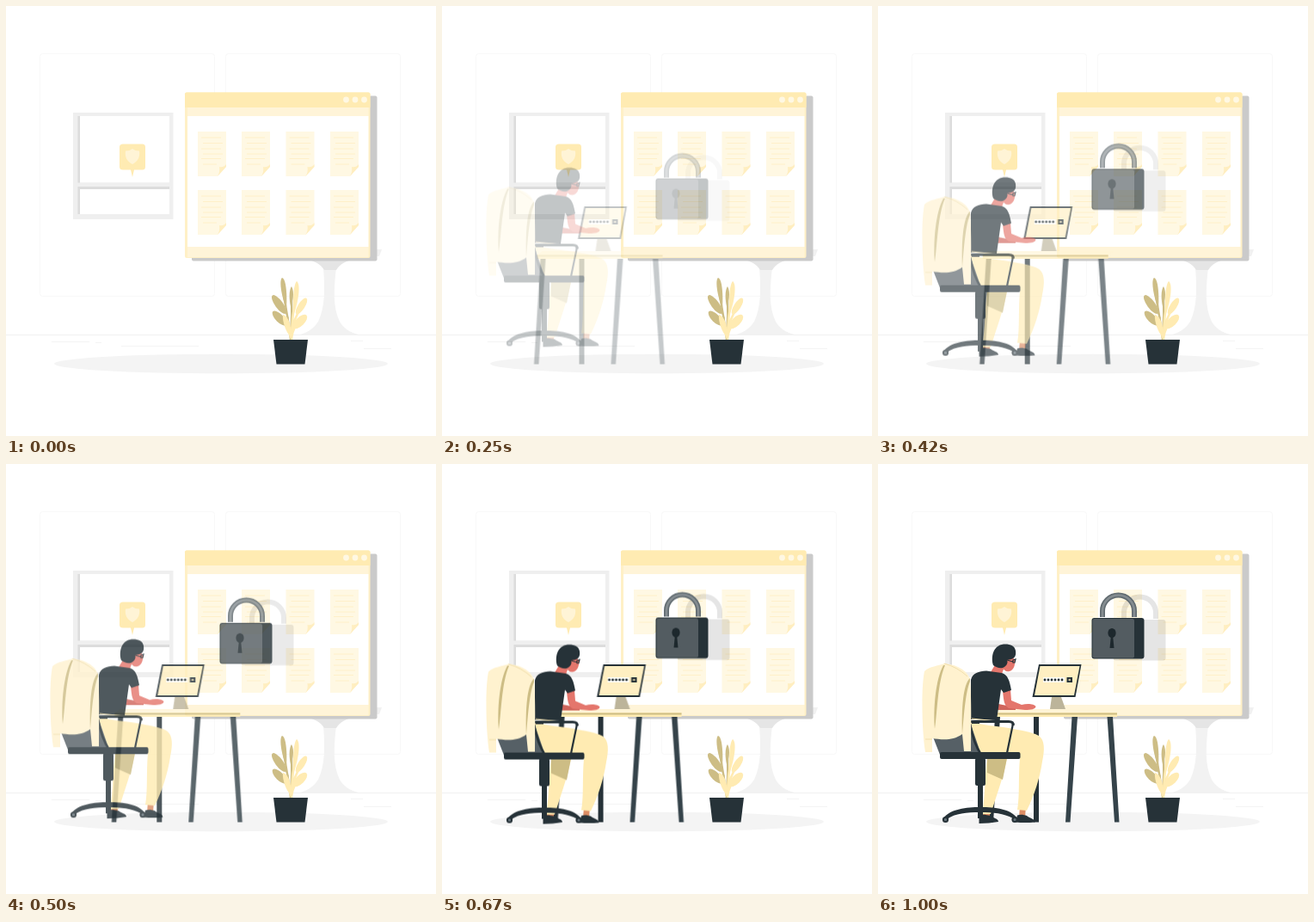
An HTML page that plays this animation: 500 px wide and 500 px high, repeating every 1040 ms.

```html
<!DOCTYPE html>
<html lang="en">
<head>
<meta charset="utf-8">
<title>Secure desk</title>
<style>
html, body { margin: 0; width: 100%; height: 100%; overflow: hidden; background: #fff; }
svg { display: block; width: 100vw; height: 100vh; }
.dark { fill: #263238; }
.cream { fill: #ffebb2; }
.pale { fill: #fff4d6; }
.olive { fill: #cdbd85; }
.skin { fill: #e4766c; }
.steel { fill: #566066; }
.line { fill: none; stroke: #263238; }

/* Each group slides 30px into place and overshoots a little. */
.enter { animation: enter 1040ms infinite; }
.down { --from: translateY(-30px); }
.right { --from: translateX(-30px); }
.up { --from: translateY(30px); }
@keyframes enter {
  0% {
    opacity: 0;
    transform: var(--from);
    animation-timing-function: cubic-bezier(.32, -.01, .483, 1.38);
  }
  93.3%, 100% { opacity: 1; transform: none; }
}
</style>
</head>
<body>
<svg viewBox="0 0 500 500">
  <defs>
    <g id="doc">
      <path fill="#fff8e3" d="M0 0H33V41L23 52H0z"/>
      <path fill="#ffeec0" d="M23 52Q26 47 25 41Q30 42 33 38V41z"/>
      <path fill="none" stroke="#fff0c9" d="M4 7H27M6 13.500H29M4 20H27M6 26H29M4 31.500H27M6 38H22"/>
    </g>
    <g id="row">
      <use href="#doc" x="223"/>
      <use href="#doc" x="274"/>
      <use href="#doc" x="325.500"/>
      <use href="#doc" x="377"/>
    </g>
    <path id="shackle" d="M261 178V171A18.500 18.500 0 0 1 298 171V178"/>
  </defs>

  <!-- room -->
  <g fill="none" stroke="#f8f8f8">
    <rect x="39.500" y="55.500" width="203" height="282" rx="3"/>
    <rect x="255.500" y="55.500" width="203" height="282" rx="3"/>
    <path stroke="#f1f1f1" d="M0 382.500H500"/>
    <path stroke="#f4f4f4" d="M53 390.500H97M104 391.500H111M134 395.500H224M401 389.500H415M416 398.500H448"/>
  </g>
  <ellipse cx="250" cy="416" rx="194" ry="11.300" fill="#f4f4f4"/>

  <!-- window -->
  <path fill="#efefef" d="M78 124H194.500V248H78z"/>
  <path fill="#dcdcdc" d="M83.500 128H190V205.500H83.500zM83.500 210H190V242H83.500z"/>
  <path fill="#fff" d="M86 128H190V205.500H86zM86 213H190V242H86z"/>

  <!-- round table -->
  <path fill="#f1f1f1" d="M337 283H437L434 291H345z"/>
  <path fill="#f2f2f2" d="M369 304C371 330 371 350 363 367C358 375 350 380 342 382H410C400 380 392 374 388 367C380 350 381 330 384 304z"/>
  <path fill="#e5e5e5" d="M345 293H408C396 296 388 300 384 307H370C366 300 358 296 345 293z"/>

  <!-- screen -->
  <rect x="216" y="104.500" width="215.500" height="192" rx="2" fill="#cacaca"/>
  <rect x="208" y="100.500" width="215.500" height="192.500" rx="2" fill="#fff0c6"/>
  <path fill="#fff4d8" d="M211 118H421.500V128H211zM211 280H421.500V292H211z"/>
  <path fill="#fff" d="M211 128H421.500V280H211z"/>
  <path class="cream" d="M208 118V102.500Q208 100.500 210 100.500H421.500Q423.500 100.500 423.500 102.500V118z"/>
  <g fill="#fff8e3">
    <circle cx="395.500" cy="109" r="3.400"/>
    <circle cx="406" cy="109" r="3.400"/>
    <circle cx="416.500" cy="109" r="3.400"/>
  </g>
  <use href="#row" y="146"/>
  <use href="#row" y="214"/>

  <!-- notification -->
  <path class="cream" d="M136 160.500H158.500Q162 160.500 162 164V187Q162 190.500 158.500 190.500H149L147 199L145 190.500H136Q132 190.500 132 187V164Q132 160.500 136 160.500z"/>
  <path class="pale" d="M147 166Q150 168.500 155 168.500C156 176 153 181 147 184C141 181 138 176 139 168.500Q144 168.500 147 166z"/>

  <!-- plant -->
  <path fill="none" stroke="#cdbd85" stroke-width="2.400" d="M331 388C329 368 325 350 322 330M330 380Q326 370 317 362M328 364Q326 352 318 347M331 384Q333 360 332 335"/>
  <g class="olive">
    <path d="M321 316C326 317 327 338 326 351C321 341 317 319 321 316z"/>
    <path d="M332 326C336 333 333 345 331 349C329 341 329 330 332 326z"/>
    <ellipse cx="317.500" cy="347" rx="4.600" ry="13" transform="rotate(-36 317.500 347)"/>
    <ellipse cx="318" cy="363" rx="4.600" ry="11" transform="rotate(-44 318 363)"/>
  </g>
  <path fill="none" stroke="#ffebb2" stroke-width="2.600" d="M332 388Q332 360 338 335M332 384Q334 362 345 348M332 386Q334 372 343 366M331 386Q330 374 325 362"/>
  <g class="cream">
    <path d="M338 320C343 323 340 344 335 357C333 346 334 324 338 320z"/>
    <ellipse cx="343.500" cy="349" rx="4" ry="11" transform="rotate(32 343.500 349)"/>
    <ellipse cx="342" cy="367" rx="5" ry="10.500" transform="rotate(45 342 367)"/>
    <path d="M322 359C328 360 333 373 331 385C326 380 321 367 322 359z"/>
  </g>
  <path class="dark" d="M311 388H351L347.500 416.500H314.500z"/>

  <!-- padlock -->
  <g class="enter up">
    <g opacity=".1" transform="translate(25 2)">
      <use href="#shackle" fill="none" stroke="#000" stroke-width="6"/>
      <rect x="248.500" y="179" width="61" height="47.500" rx="3"/>
    </g>
    <use href="#shackle" fill="none" stroke="#626c71" stroke-width="6"/>
    <use href="#shackle" fill="none" stroke="#858d91" stroke-width="2.600"/>
    <rect class="dark" x="248.500" y="179" width="61" height="47.500" rx="3"/>
    <path fill="#535c61" d="M251.500 180H296Q298 180 298 182V223.500Q298 225.500 296 225.500H251.500Q249.500 225.500 249.500 223.500V182Q249.500 180 251.500 180z"/>
    <ellipse cx="272" cy="196.500" rx="4.600" ry="5.500" fill="#1d282d"/>
    <path fill="#1d282d" d="M271 199H273L274.500 214H269.500z"/>
  </g>

  <!-- desk -->
  <g class="enter right">
    <path class="dark" d="M136 294H142L134 416.500H128.500zM181 294H187V416.500H181z"/>
    <path fill="#35434a" d="M225.500 294H232L223.500 416.500H218zM266.500 294H273L280.500 416.500H275z"/>
    <path class="pale" d="M138 285H284L278 290H132z"/>
    <path class="cream" d="M132 289H278V294H132z"/>
    <path class="olive" d="M132 289.500H278V291.500H132z"/>
    <path fill="#bcb49a" d="M202 271H213L218 285H200z"/>
    <path class="dark" d="M187 233H236.500L229.500 271H179.500z"/>
    <path fill="#ffefc2" d="M188.500 235H234.500L228 269H182z"/>
    <path fill="#fffdf6" d="M192 248H217V254H192z"/>
    <path class="line" stroke-width="2.800" stroke-linecap="round" stroke-dasharray="0 4" d="M194 251H214.500"/>
    <path class="dark" d="M219.500 248H226V254H219.500z"/>
    <circle cx="222.700" cy="251" r="1.300" fill="#c9bf9d"/>
  </g>

  <!-- worker and chair -->
  <g class="enter down">
    <path fill="#cf655c" d="M140 279L160 283V286H138z"/>
    <path fill="#dc8d65" d="M122 402H130V411H121zM165 398H172L171 411H164z"/>
    <path class="cream" d="M127 342H150C147 360 138 385 131 407H121C125 385 124 360 127 342z"/>
    <path class="olive" d="M127 342H150L145 367L127 359z"/>
    <path class="cream" d="M108 300C118 303 140 305 152 307C166 310 178 311 187 316C194 321 194 332 191 346C188 366 182 384 173 403L162 402C165 385 163 364 165 342H118C111 332 107 316 108 300z"/>
    <path class="dark" d="M117.500 408.500C122 407 126 408 131 409C134 412 140 412 140 416Q129 418 117.500 418z"/>
    <path class="dark" d="M162 408.500C166 407 170 408 173 409C176 412 182 412 182.500 416.500Q171 417.500 160 416.500z"/>

    <path class="skin" d="M131 242L137 232L147 236L144 244z"/>
    <path class="skin" d="M146 232C147 225 157 222 159 228C160 232 158 240 153 241C149 242 146 240 145 236z"/>
    <path class="dark" d="M134 234C131 224 134 211 146 209.500C153 209 159 211 160 217C161 224 158 226 155 227L150 228C152 232 148 236 145 237C141 238 137 236 134 234z"/>
    <path class="line" stroke-width="1.200" d="M150 228L157 230M157 228L160 227L159 231L157 231z"/>

    <path class="skin" d="M145 264L154 262L155 275L167 280C174 278 182 279 183.500 282C183 285 178 286 171 286L152 284C146 281 146 272 145 264z"/>
    <path class="dark" d="M108 297V251C110 243 117 241 126 240.500L144 243C151 245 153 252 155 263L146 266L143 262L138 298z"/>
    <path fill="none" stroke="#ffebb2" d="M109 296L138 299"/>

    <path class="steel" d="M63 315L72 338H120L108 303z"/>
    <path class="line" stroke-width="2.600" d="M107 302Q111 325 120 338"/>
    <path class="line" stroke-width="3" d="M109 300.500H118"/>
    <path class="line" stroke-width="3.200" d="M108 299.500H152Q158 299.500 157 304"/>
    <path class="line" stroke-width="2.200" d="M157 302L150 336"/>
    <path fill="#fff2cf" d="M55 335C51 310 50 260 54 241C60 235 70 235 77 232C91 233 104 240 107 250C109 275 108 305 108 334H100L98 314C86 323 72 320 63 319V335z"/>
    <path class="olive" d="M76 234C67 250 64 285 66 308C69 290 69 255 78 234z"/>
    <path class="olive" d="M107 249C99 256 97 283 98 314C100 290 102 264 107 253z"/>
    <path fill="none" stroke="#f2dfac" d="M55 320L63 320M77 232Q92 236 104 247"/>

    <rect class="dark" x="72" y="335" width="93.500" height="8" rx="2"/>
    <rect class="dark" x="113" y="342" width="12" height="32" rx="2"/>
    <path class="dark" d="M116 373H122V412H116z"/>
    <path class="dark" d="M76 412C84 401 103 399 119 399C137 399 154 401 162 412L157 412C146 406 134 405 119 405C103 405 90 406 80 413z"/>
    <g fill="#65727a" stroke="#263238" stroke-width="2">
      <circle cx="78.500" cy="413.500" r="2.600"/>
      <circle cx="159" cy="413.500" r="2.600"/>
    </g>
  </g>
</svg>
</body>
</html>
```
